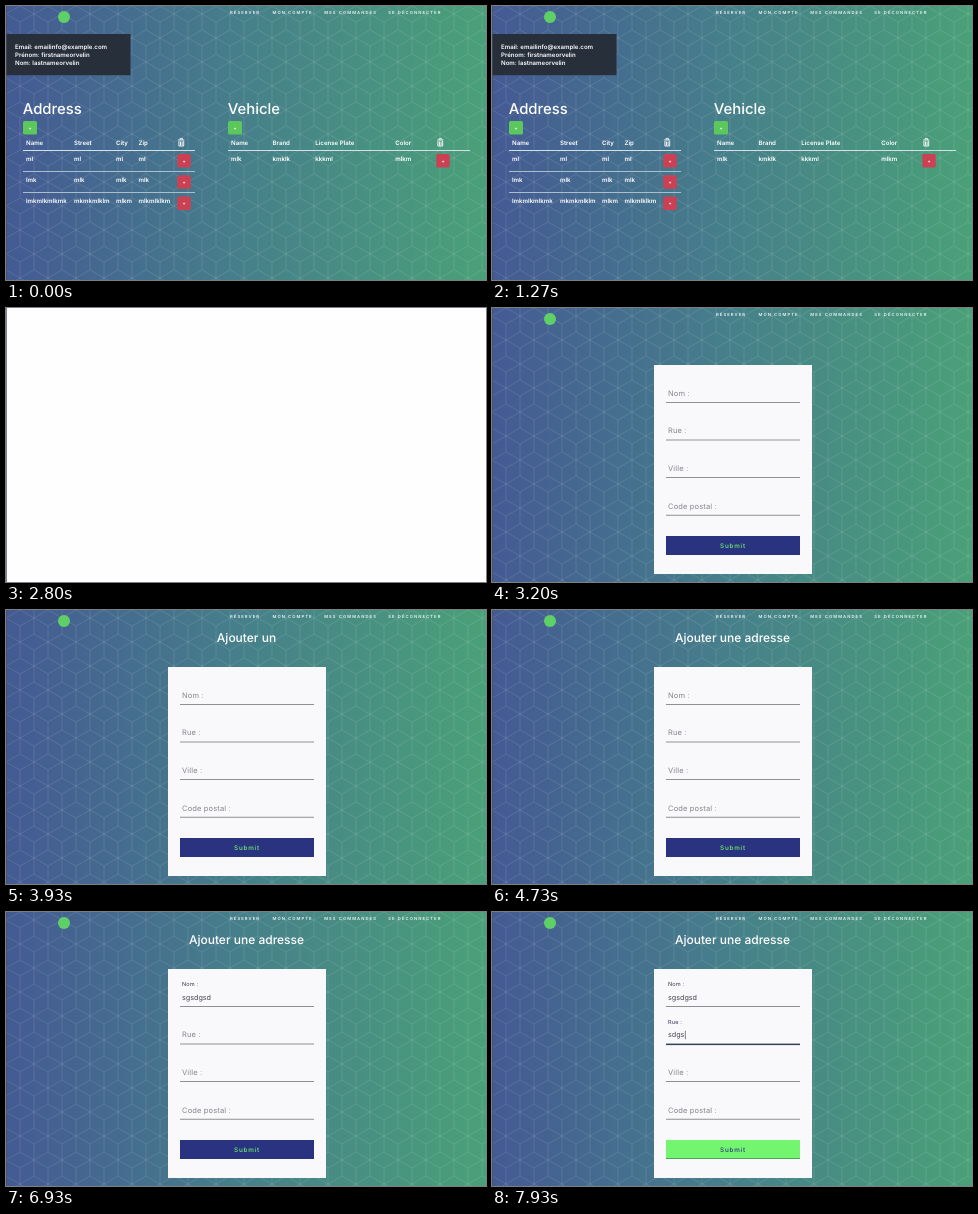
An HTML page for the animation above (8 s loop, 480x274 px).

```html
<!DOCTYPE html>
<html lang="fr">
<head>
<meta charset="utf-8">
<style>
  html, body { margin: 0; width: 100%; height: 100%; overflow: hidden; }
  svg { display: block; width: 480px; height: 274px; font-family: Inter, sans-serif; text-rendering: geometricPrecision; }
  .nav { font-size: 4.2px; font-weight: 600; letter-spacing: 1.07px; fill: #eef3f6; }
  .small { font-size: 6.1px; font-weight: 600; fill: #fff; }
  .heading { font-size: 14.9px; font-weight: 500; fill: #fff; }
  .title { font-size: 12px; font-weight: 500; fill: #fff; text-anchor: middle; }
  .label { letter-spacing: .15px; }
  .value { font-size: 7.2px; fill: #454550; }
  .submit { font-size: 6.3px; font-weight: 500; letter-spacing: .8px; text-anchor: middle; }
  .plus { font-size: 4.6px; font-weight: 700; fill: #fff; text-anchor: middle; }
</style>
</head>
<body>
<svg viewBox="0 0 480 274">
  <defs>
    <linearGradient id="sky">
      <stop stop-color="#445a93"/>
      <stop offset=".5" stop-color="#46808a"/>
      <stop offset="1" stop-color="#4aa078"/>
    </linearGradient>
    <pattern id="cubes" width="28" height="48" patternUnits="userSpaceOnUse">
      <path d="M14 0L28 8V24L14 32L0 24V8ZM0 8L14 16L28 8M14 16V48M0 40L14 32L28 40V48M0 40V48M0 0V8M28 0V8"
        fill="none" stroke="#fff" stroke-opacity=".15" stroke-width=".7"/>
    </pattern>
  </defs>
  <rect width="480" height="274" fill="url(#sky)"/>
  <rect width="480" height="274" fill="url(#cubes)"/>
  <circle cx="58" cy="11" r="6" fill="#5fd068"/>
  <g id="nav"></g>
  <g id="list"></g>
  <g id="form"></g>
  <rect id="blank" width="480" height="274" fill="#fefdff"/>
  <rect width=".7" height="274" fill="#4a4d5c"/>
</svg>
<script>
const LOOP = 8000, LEAVE = 2800, ARRIVE = 3200;
const byId = id => document.getElementById(id);
const clamp = v => Math.max(0, Math.min(1, v));

function add(parent, tag, attrs, text = '') {
  const el = document.createElementNS('http://www.w3.org/2000/svg', tag);
  set(el, attrs);
  el.textContent = text;
  return parent.appendChild(el);
}
function set(el, attrs) {
  for (const key in attrs) el.setAttribute(key, attrs[key]);
}
const write = (parent, cls, x, y, text) => add(parent, 'text', { class: cls, x, y }, text);
const box = (parent, x, y, width, height, fill, rx = 0) =>
  add(parent, 'rect', { x, y, width, height, fill, rx });

function mix(a, b, p) {
  return `rgb(${a.map((v, i) => Math.round(v + (b[i] - v) * p))})`;
}

// Header
[[224, 'RÉSERVER'], [266.5, 'MON COMPTE'], [318.3, 'MES COMMANDES'], [382.3, 'SE DÉCONNECTER']]
  .forEach(([x, text]) => write(byId('nav'), 'nav', x, 8.4, text));

// Account page
const list = byId('list');
box(list, 0, 28, 124.5, 41.2, '#272f3b');
['Email: emailinfo@example.com', 'Prénom: firstnameorvelin', 'Nom: lastnameorvelin']
  .forEach((line, i) => write(list, 'small', 9, 43 + i * 8.2, line));

function button(x, y, width, fill) {
  const rect = box(list, x, y, width, 13.6, fill, 1.5);
  write(list, 'plus', x + width / 2, y + 8.5, '+');
  return rect;
}

function table(title, left, right, columns, trashX, rows) {
  write(list, 'heading', left - .3, 107.5, title);
  const addButton = button(left, 115, 14, '#5bc75c');
  box(list, left, 144, right - left, 1, '#d5dfe6');
  add(list, 'path', {
    d: `M${trashX - 3} 134h6M${trashX - 1.2} 133.8v-1.2h2.4v1.2M${trashX - 2.4} 135v5h4.8v-5M${trashX - .8} 135.5v4M${trashX + .8} 135.5v4`,
    fill: 'none', stroke: '#eef3f6', 'stroke-width': 1
  });
  rows.forEach((row, r) => {
    const y = r ? 133.6 + r * 21.2 : 138.8;
    row.forEach((cell, c) => write(list, 'small', columns[c], y, cell));
    if (!r) return;
    button(trashX - 4, y - 6.8, 13.4, '#cb4053');
    if (r > 1) box(list, left, Math.round(y - 10.8), right - left, 1, '#a9bfcd');
  });
  return addButton;
}

const addAddress = table('Address', 17, 189, [20, 68, 110, 132.5], 175.3, [
  ['Name', 'Street', 'City', 'Zip'],
  ['ml', 'ml', 'ml', 'ml'],
  ['lmk', 'mlk', 'mlk', 'mlk'],
  ['lmkmlkmlkmk', 'mkmkmlklm', 'mlkm', 'mlkmlklkm']
]);
table('Vehicle', 222, 464, [225, 266.5, 309.3, 389.2], 434.3, [
  ['Name', 'Brand', 'License Plate', 'Color'],
  ['mlk', 'kmklk', 'kkkml', 'mlkm']
]);

// Address form
const form = byId('form');
const title = write(form, 'title', 240.5, 32, '');
box(form, 162, 57, 158, 209, '#f9f8fb');

const fields = [
  { label: 'Nom :', text: 'sgsdgsd', focus: 4900, type: 5060, blur: 5900, step: 100 },
  { label: 'Rue :', text: 'sdgs', focus: 6950, type: 7350, blur: LOOP, step: 120 },
  { label: 'Ville :' },
  { label: 'Code postal :' }
].map((field, i) => {
  const y = 87.7 + i * 37.6;
  return {
    text: '', focus: Infinity, type: Infinity, blur: Infinity, step: 100, ...field, y,
    labelEl: write(form, 'label', 176, y, field.label),
    valueEl: write(form, 'value', 176, y, ''),
    line: box(form, 174, y + 6.3, 134, .8, '#777'),
    caret: box(form, 176, y - 6.5, .6, 8.5, '#333')
  };
});
const submit = box(form, 174, 228, 134, 19, '');
const submitEdge = box(form, 174, 246, 134, 1, '');
const submitText = write(form, 'submit', 241, 239.8, 'Submit');

function drawField(f, t) {
  const lift = clamp((t - f.focus) / 200);
  set(f.labelEl, {
    y: f.y - 13.8 * lift,
    'font-size': 7.5 - 1.9 * lift,
    fill: mix([133, 133, 140], [50, 58, 78], lift)
  });
  const count = Math.max(0, Math.min(f.text.length, Math.floor((t - f.type) / f.step) + 1));
  f.valueEl.textContent = f.text.slice(0, count);
  const focused = t >= f.focus && t < f.blur;
  set(f.line, { height: focused ? 1.5 : .8, fill: focused ? '#2f4256' : '#777' });
  const lastKey = count ? f.type + (count - 1) * f.step : f.focus;
  set(f.caret, {
    x: 176.5 + (count ? f.valueEl.getComputedTextLength() : 0),
    opacity: focused && (t - lastKey) % 1000 < 500 ? 1 : 0
  });
}

function draw(t) {
  const onForm = t >= ARRIVE;
  set(list, { display: t < LEAVE ? 'inline' : 'none' });
  set(byId('blank'), { display: t >= LEAVE && !onForm ? 'inline' : 'none' });
  set(form, { display: onForm ? 'inline' : 'none' });

  const pressed = t > 2300;
  set(addAddress, {
    fill: pressed ? '#3f9f52' : '#5bc75c',
    stroke: pressed ? '#63c976' : 'none',
    'stroke-width': .8, 'stroke-dasharray': '1 1'
  });
  if (!onForm) return;

  title.textContent = 'Ajouter une adresse'.slice(0, Math.max(0, Math.floor((t - ARRIVE) / 73)));
  fields.forEach(f => drawField(f, t));
  const hover = clamp((t - 7650) / 200);
  const navy = [42, 51, 128], green = [116, 245, 112];
  set(submit, { fill: mix(navy, green, hover) });
  set(submitEdge, { fill: mix(navy, [72, 165, 92], hover) });
  set(submitText, { fill: mix(green, navy, hover) });
}

const start = performance.now();
function tick() {
  draw((performance.now() - start) % LOOP);
  requestAnimationFrame(tick);
}
tick();
</script>
</body>
</html>
```
